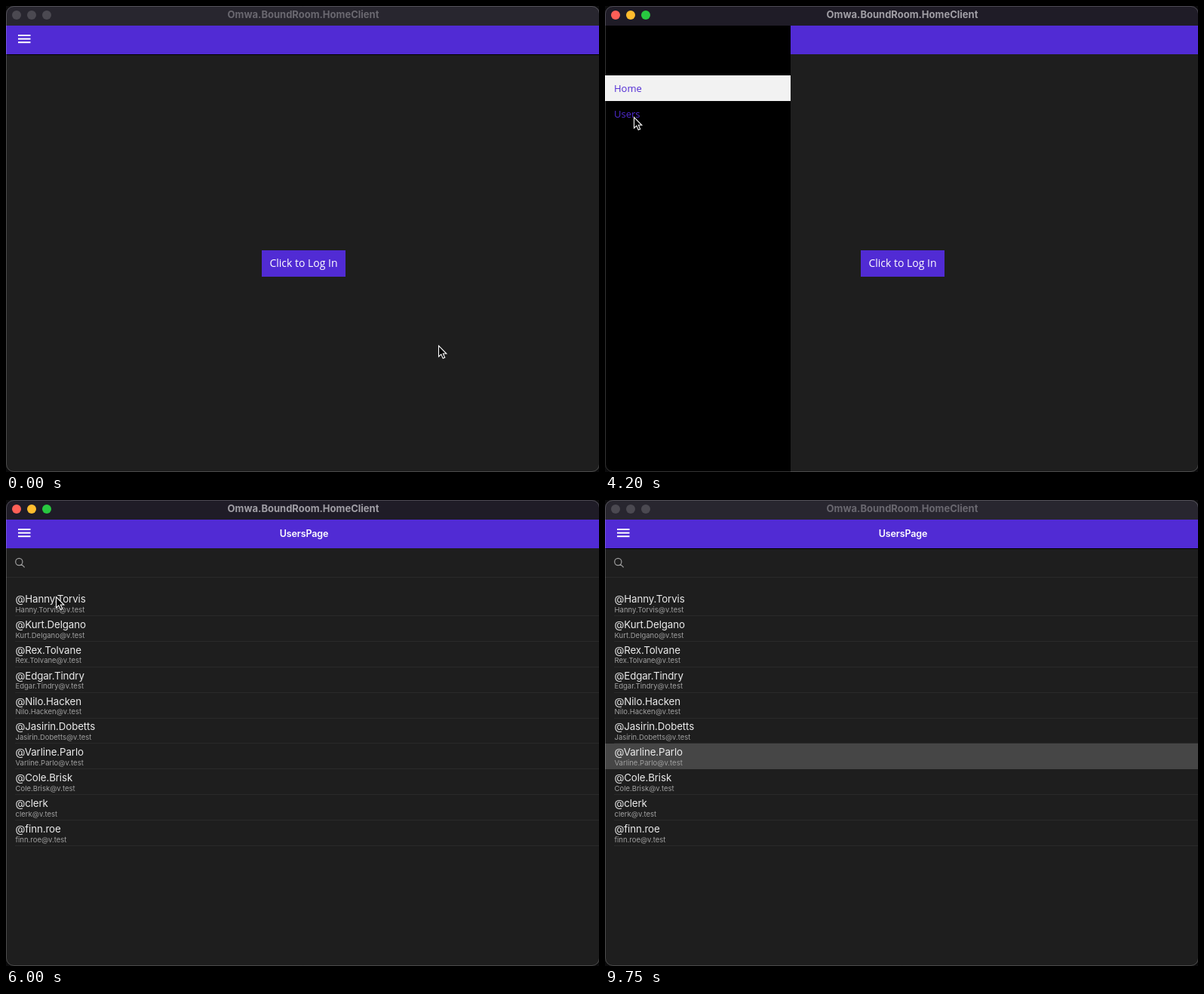
These frames come from a looping animation (786x618 px, 9.85 s). An HTML page with a canvas:

```html
<!DOCTYPE html>
<html lang="en">
<head>
<meta charset="utf-8">
<title>Users page</title>
<style>
  html, body { margin: 0; width: 786px; height: 618px; overflow: hidden; background: #0b0b0c; }
  canvas { display: block; }
</style>
</head>
<body>
<canvas id="stage" width="786" height="618"></canvas>
<script>
const ctx = document.getElementById('stage').getContext('2d');
const W = 786, H = 618, LOOP = 9850, STEP = 150;
const PURPLE = '#512bd4', BODY = '#1e1e1e', LINE = '#2a2a2a';
const UI = 'Inter, sans-serif', SANS = '"Open Sans", sans-serif';
const USERS = ['Hanny.Torvis', 'Kurt.Delgano', 'Rex.Tolvane', 'Edgar.Tindry', 'Nilo.Hacken',
  'Jasirin.Dobetts', 'Varline.Parlo', 'Cole.Brisk', 'clerk', 'finn.roe'];
const MAIL = '@v.test';
const DRAWER = 246;

// Pointer moves: start time, duration, then where it goes
const POINTER_HOME = [573, 450];
const MOVES = [
  [1200, 750, 74, 70], [1950, 450, 30, 41], [2850, 450, 67, 151], [3300, 300, 38, 147],
  [4200, 600, 64, 154], [5700, 300, 66, 128], [6300, 600, 152, 260], [6900, 300, 151, 202],
  [7500, 150, 151, 261], [7800, 300, 152, 332], [8400, 450, 538, 520], [8850, 450, 760, 640]
];

const progress = (t, start, duration) => Math.min(1, Math.max(0, (t - start) / duration));
const smooth = p => p * p * (3 - 2 * p);
const easeOut = p => 1 - (1 - p) ** 3;

function box(x, y, w, h, color) {
  ctx.fillStyle = color;
  ctx.fillRect(x, y, w, h);
}

function dot(x, y, r, color) {
  ctx.fillStyle = color;
  ctx.beginPath();
  ctx.arc(x, y, r, 0, 7);
  ctx.fill();
}

function text(str, x, y, font, color, align = 'left', spacing = 0) {
  ctx.font = font;
  ctx.fillStyle = color;
  ctx.textAlign = align;
  ctx.letterSpacing = spacing + 'px';
  ctx.fillText(str, x, y);
}

function titleBar(active) {
  box(0, 0, W, 26, active ? '#1f1c27' : '#28262f');
  const lights = active ? ['#ff5f57', '#febc2e', '#28c840'] : Array(3).fill('#4b4951');
  lights.forEach((color, i) => dot(14 + 20 * i, 12, 6, color));
  text('Omwa.BoundRoom.HomeClient', 394, 16, '700 13px ' + UI,
    active ? '#a19fa6' : '#6a6870', 'center');
}

function header(active, title) {
  box(0, 26, W, 38, PURPLE);
  if (!active) box(0, 64, W, 1, '#000');
  for (let i = 0; i < 3; i++) box(16, 38 + 4.6 * i, 16.5, 2, '#fff');
  text(title, 395, 49, '600 12.5px ' + UI, '#fff', 'center', -0.1);
}

function homePage() {
  box(339, 324, 111, 35, PURPLE);
  text('Click to Log In', 394.5, 346, '14px ' + SANS, '#fff', 'center');
}

function spinner(t) {
  ctx.save();
  ctx.translate(394.5, 87);
  ctx.rotate((t - 5100) / 160 - 0.12);
  ctx.lineWidth = 2.6;
  ctx.lineCap = 'round';
  for (let i = 0; i < 8; i++) {
    const shade = 92 + 7 * i;
    ctx.strokeStyle = `rgb(${shade},${shade},${shade})`;
    ctx.beginPath();
    ctx.moveTo(0, -5.5);
    ctx.lineTo(0, -10);
    ctx.stroke();
    ctx.rotate(Math.PI / 4);
  }
  ctx.restore();
}

function searchBar(y) {
  box(0, y + 19, W, 1, LINE);
  ctx.strokeStyle = '#a0a0a0';
  ctx.lineWidth = 1.2;
  ctx.beginPath();
  ctx.arc(17.3, y - 1, 4.6, 0, 7);
  ctx.moveTo(20.6, y + 2.3);
  ctx.lineTo(24.6, y + 6.3);
  ctx.stroke();
}

function userList(selected) {
  USERS.forEach((name, i) => {
    const y = 119.4 + 33.9 * i;
    box(12, Math.round(y + 33.5), W - 12, 1, LINE);
    if (i === selected) box(0, Math.round(y), W, 34, '#464646');
    text('@' + name, 12.5, y + 16.5, '13.3px ' + UI, '#ececec', 'left', -0.1);
    text(name + MAIL, 12.5, y + 29.2, '9.5px ' + UI, '#a0a0a0');
  });
}

function usersPage(t) {
  if (t < 5550) {
    spinner(t);
    box(0, 110, W, 1, LINE);
    searchBar(129);
  } else {
    searchBar(83);
    userList(t < 7500 ? -1 : t < 8250 ? 2 : 6);
  }
}

function drawer(t, selected) {
  const open = easeOut(progress(t, 2550, 590)) - easeOut(progress(t, 4200, 590));
  if (open <= 0) return;
  const left = Math.round(DRAWER * (open - 1));
  box(left, 26, DRAWER, H - 26, '#000');
  box(left, 92 + 34 * selected, DRAWER, 34, '#f2f2f2');
  ['Home', 'Users'].forEach((label, i) =>
    text(label, left + 12, 114 + 34 * i, '13px ' + SANS, PURPLE));
}

function pointerAt(t) {
  let [x, y] = POINTER_HOME;
  for (const [start, duration, toX, toY] of MOVES) {
    const p = smooth(progress(t, start, duration));
    x += (toX - x) * p;
    y += (toY - y) * p;
  }
  return [Math.round(x), Math.round(y)];
}

function pointer(x, y) {
  ctx.save();
  ctx.translate(x + 0.5, y + 0.5);
  ctx.fillStyle = '#000';
  ctx.strokeStyle = '#fff';
  ctx.lineWidth = 1.1;
  const arrow = new Path2D('M0 0V14.5L3.3 11.4L5.7 16.8L8.2 15.7L5.8 10.5H10.3Z');
  ctx.fill(arrow);
  ctx.stroke(arrow);
  ctx.restore();
}

function windowShape(x, y, w, h) {
  ctx.beginPath();
  ctx.roundRect(x, y, w, h, 10);
}

function draw(t) {
  const active = t >= 2400 && t < 9750;
  const onUsers = t >= 4350;
  ctx.clearRect(0, 0, W, H);
  ctx.save();
  windowShape(0, 0, W + 1, H);
  ctx.clip();
  box(0, 0, W, H, BODY);
  titleBar(active);
  header(active, onUsers ? 'UsersPage' : '');
  if (onUsers) usersPage(t); else homePage();
  drawer(t, onUsers ? 1 : 0);
  ctx.restore();
  windowShape(0.5, 0.5, W, H - 1);
  ctx.strokeStyle = 'rgba(255,255,255,.2)';
  ctx.lineWidth = 1;
  ctx.stroke();
  pointer(...pointerAt(t));
}

function tick(now) {
  draw(Math.floor(now % LOOP / STEP) * STEP);
  requestAnimationFrame(tick);
}
requestAnimationFrame(tick);
</script>
</body>
</html>
```
